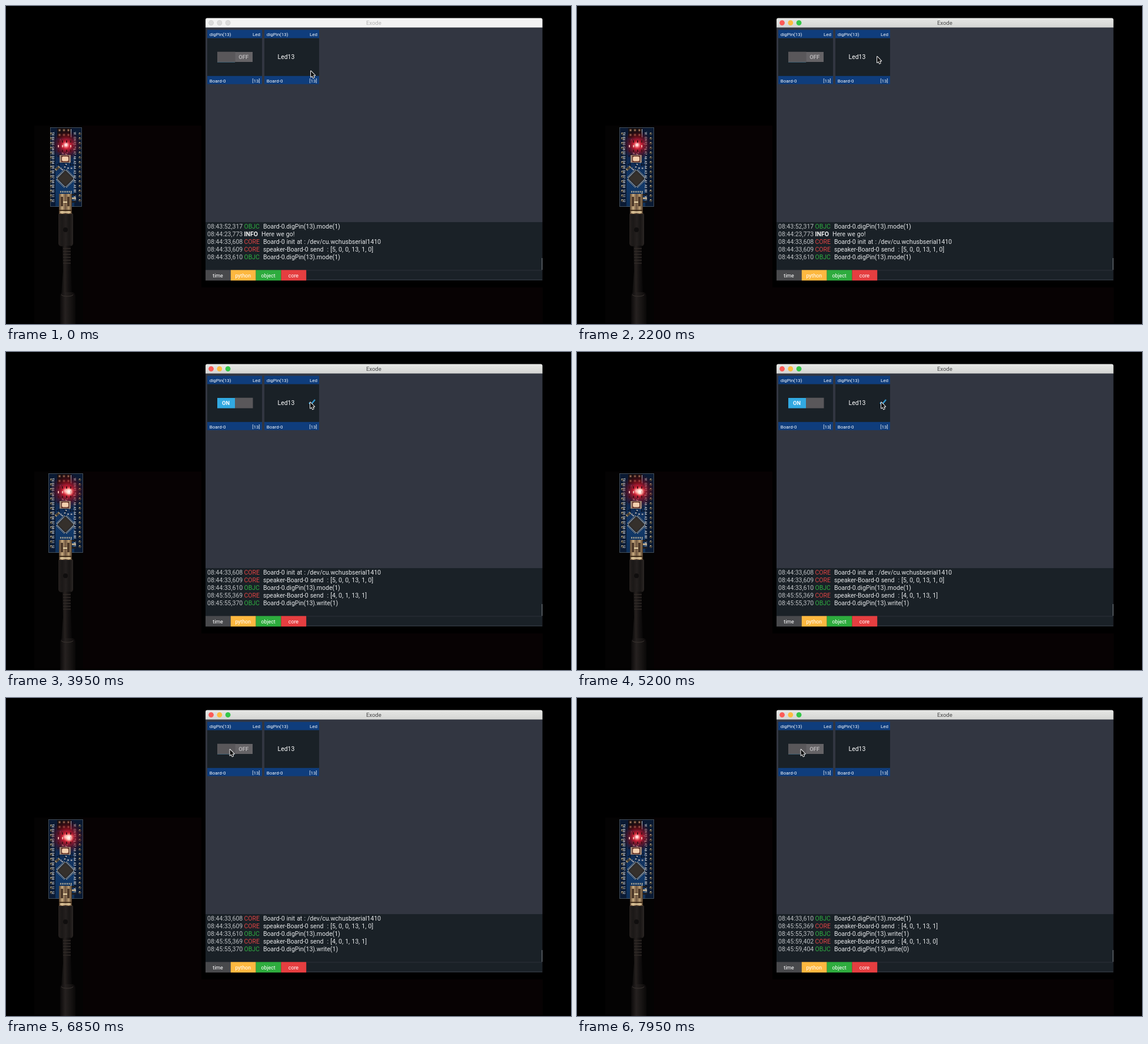
Recreate the animation shown at these times as an HTML page with a canvas. Size 960 by 540 pixels, loop 8 s.

```html
<!DOCTYPE html>
<html lang="en">
<head>
<meta charset="utf-8">
<title>Exode</title>
<style>
html, body { margin: 0; width: 100%; height: 100%; overflow: hidden; background: #000; }
canvas { display: block; }
</style>
</head>
<body>
<canvas id="stage" width="960" height="540"></canvas>
<script>
const ctx = document.getElementById('stage').getContext('2d');
const LOOP = 8000;
const TIMES = {
  focus: 1450, switchOn: 2650, switchOff: 6620,
  ledOn: 2950, ledOff: 6980, logOn: 3350, logOff: 7380
};
const SLIDE = 200;
const LOG = [
  ['08:43:52,317', 'OBJC', 'Board-0.digPin(13).mode(1)'],
  ['08:44:23,773', 'INFO', 'Here we go!'],
  ['08:44:33,608', 'CORE', 'Board-0 init at : /dev/cu.wchusbserial1410'],
  ['08:44:33,609', 'CORE', 'speaker-Board-0 send  : [5, 0, 0, 13, 1, 0]'],
  ['08:44:33,610', 'OBJC', 'Board-0.digPin(13).mode(1)'],
  ['08:45:55,369', 'CORE', 'speaker-Board-0 send  : [4, 0, 1, 13, 1]'],
  ['08:45:55,370', 'OBJC', 'Board-0.digPin(13).write(1)'],
  ['08:45:59,402', 'CORE', 'speaker-Board-0 send  : [4, 0, 1, 13, 0]'],
  ['08:45:59,404', 'OBJC', 'Board-0.digPin(13).write(0)']
];
const TAG_COLORS = { OBJC: '#2fae42', INFO: '#f4f4f4', CORE: '#e04444' };
const BUTTONS = [['time', '#48494c'], ['python', '#fdb840'], ['object', '#2eac3e'], ['core', '#e53e40']];
// Cursor moves: start, end, from, to
const MOVES = [
  [1100, 1450, [518, 110], [510, 85.5]],
  [2350, 2580, [510, 85.5], [517, 85]],
  [5650, 6250, [517, 85], [380.5, 87]]
];

function rect(x, y, w, h, color) {
  ctx.fillStyle = color;
  ctx.fillRect(x, y, w, h);
}

function poly(points, color) {
  ctx.beginPath();
  points.forEach(([x, y]) => ctx.lineTo(x, y));
  ctx.closePath();
  ctx.fillStyle = color;
  ctx.fill();
}

function rounded(x, y, w, h, r, color) {
  ctx.beginPath();
  ctx.roundRect(x, y, w, h, r);
  ctx.fillStyle = color;
  ctx.fill();
}

function disc(x, y, r, color) {
  ctx.beginPath();
  ctx.arc(x, y, r, 0, Math.PI * 2);
  ctx.fillStyle = color;
  ctx.fill();
}

function text(str, x, y, size, color, align = 'left', weight = 400) {
  ctx.font = `${weight} ${size}px Roboto, sans-serif`;
  ctx.textAlign = align;
  ctx.textBaseline = 'alphabetic';
  ctx.fillStyle = color;
  ctx.fillText(str, x, y);
}

function gradient(x0, y0, x1, y1, colors) {
  const g = ctx.createLinearGradient(x0, y0, x1, y1);
  colors.forEach((c, i) => g.addColorStop(i / (colors.length - 1), c));
  return g;
}

function glow(x, y, r, stops) {
  const g = ctx.createRadialGradient(x, y, 0, x, y, r);
  stops.forEach(([at, c]) => g.addColorStop(at, c));
  rect(x - r, y - r, r * 2, r * 2, g);
}

function noise(n) {
  const v = Math.sin(n * 12.9898) * 43758.5453;
  return v - Math.floor(v);
}

function clamp(v) {
  return Math.min(1, Math.max(0, v));
}

function drawChip() {
  ctx.save();
  ctx.translate(101, 293);
  ctx.rotate(Math.PI / 4);
  for (let side = 0; side < 4; side++) {
    for (let i = 0; i < 8; i++) rect(-9.2 + i * 2.5, -12.8, 1.2, 3.5, '#b5aa98');
    ctx.rotate(Math.PI / 2);
  }
  rect(-9.8, -9.8, 19.6, 19.6, '#292523');
  rect(-8.3, -8.3, 16.6, 16.6, '#35302c');
  ctx.restore();
}

function drawPins(x, labelX, names) {
  for (let i = 0; i < 15; i++) {
    const y = 217 + i * 8.1;
    disc(x, y, 2.1, '#7c6c50');
    disc(x, y, 1.2, '#090c12');
    disc(x - 0.6, y - 1.2, 0.9, '#e4d6ae');
  }
  ctx.save();
  ctx.translate(labelX, 214);
  ctx.rotate(Math.PI / 2);
  names.split(' ').forEach((name, i) => text(name, i * 8.1, 2, 5, '#c9ced6', 'left', 700));
  ctx.restore();
}

function drawCable() {
  rounded(89, 352, 25, 56, [2, 2, 5, 5],
    gradient(89, 0, 114, 0, ['#26211f', '#1b1817', '#24201f', '#191615', '#2b2624']));
  disc(101, 380, 4, '#100e0e');
  poly([[96, 407], [110, 407], [110, 440], [112, 488], [94, 488], [97, 450]],
    gradient(94, 0, 112, 0, ['#0b0a0a', '#26211f', '#141111', '#080707']));
  for (let y = 411; y < 438; y += 5) rect(97, y, 13, 1.5, '#302a27');
  rounded(92, 486, 26, 58, [6, 6, 0, 0],
    gradient(92, 0, 118, 0, ['#0c0a0a', '#262120', '#181514', '#0a0808']));
  ctx.strokeStyle = '#3b3531';
  ctx.lineWidth = 1;
  ctx.beginPath();
  ctx.ellipse(104, 490, 10, 3, 0, 0, Math.PI);
  ctx.stroke();
}

function drawConnector() {
  for (let i = 0; i < 7; i++) rect(92 + i * 3, 314, 1.4, 3, '#c5b99e');
  for (let i = 0; i < 3; i++) rect(112, 319 + i * 6, 7, 3, i % 2 ? '#b7aa91' : '#1b1d22');
  rect(110, 317, 1, 21, '#d7dbe0');
  rect(90, 319, 22, 34, gradient(90, 0, 112, 0, ['#594330', '#c9ab80', '#6d543f', '#b99c71', '#4c3828']));
  rect(93, 324, 4, 16, '#4d3929');
  rect(104, 324, 4, 16, '#4d3929');
  rect(97, 332, 7, 2, '#ead7ab');
  rect(90, 346, 22, 2, '#46331f');
  rect(92, 349, 18, 2, '#e0ca9e');
}

function drawLed(on) {
  const x = on ? 104 : 102.5;
  glow(x, 236, on ? 30 : 26, [
    [0, 'rgba(255,70,80,.95)'], [0.3, 'rgba(225,25,45,.8)'],
    [0.6, 'rgba(140,12,28,.5)'], [1, 'rgba(70,0,10,0)']
  ]);
  glow(102, 236, 7, [[0, '#fff'], [0.3, 'rgba(255,205,205,.95)'], [1, 'rgba(255,70,80,0)']]);
  if (on) glow(107, 237, 9, [[0, '#fff'], [0.4, 'rgba(255,220,205,.95)'], [1, 'rgba(255,60,60,0)']]);
}

function drawBoard(bright, ledOn) {
  rect(48, 203, 864, 335, '#070203');
  rect(48, 203, 83, 335, '#040303');
  drawCable();

  const left = bright ? 72 : 75;
  const right = bright ? 131 : 129;
  rect(left, 206, right - left, 135, '#0a1a33');
  rect(84, 206, 32, 135, gradient(0, 206, 0, 341, ['#0b1730', '#10264a', '#123a6c', '#0f3058']));
  ctx.strokeStyle = '#59636a';
  ctx.lineWidth = 0.7;
  ctx.strokeRect(left + 0.4, 206.4, right - left - 0.8, 134.2);
  drawPins(77, 80, 'TX RX RS GN D2 D3 D4 D5 D6 D7 D8 D9 10 11 12');
  drawPins(125.5, 117, 'VI GN RS 5V A7 A6 A5 A4 A3 A2 A1 A0 RF 3V 13');

  rect(87, 207, 24, 17, '#140f12');
  for (let i = 0; i < 6; i++) {
    const x = 91 + (i % 3) * 7.5, y = 211 + Math.floor(i / 3) * 8;
    disc(x, y, 2.4, '#533a2c');
    disc(x, y, 1, '#c09678');
  }
  rect(110, 209, 1, 14, '#c8ced6');
  for (let i = 0; i < 60; i++) {
    const shade = noise(i + 5) > 0.6 ? '#b4b2b4' : '#06101f';
    rect(86 + noise(i) * 29, 226 + noise(i + 90) * 52, 1 + noise(i + 30) * 1.8, 1 + noise(i + 60) * 2, shade);
  }
  drawLed(ledOn);
  for (let i = 0; i < 4; i++) {
    for (let j = 0; j < 3; j++) {
      if (i !== 2 || j !== 1) rect(88 + i * 7, 228 + j * 8, 2, 4, j % 2 ? '#e8a9a4' : '#4a1018');
    }
  }

  rect(91, 253, 19, 13, '#9c8270');
  rect(94, 254, 13, 11, '#5c2a22');
  rounded(95, 255.5, 11, 8, 2, '#f3cfae');

  drawChip();
  ctx.save();
  ctx.translate(87, 276);
  ctx.rotate(-0.7);
  rect(-4, -2, 9, 4, '#a8936e');
  rect(-2, -2, 5, 4, '#453c32');
  ctx.restore();
  drawConnector();
}

function drawCard(x) {
  rect(x, 40.5, 93, 92.2, '#0f3d7c');
  rect(x, 54.6, 93, 64.2, '#1a2127');
  const label = (str, dx, y, align) => text(str, x + dx, y, 8, '#f4f8fd', align);
  label('digPin(13)', 3.7, 51.3);
  label('Led', 90, 51.3, 'right');
  label('Board-0', 3.7, 130.3);
  label('[13]', 89.5, 130.3, 'right');
}

function drawSwitch(k) {
  rect(359, 78, 30, 17.5, '#32a9e1');
  rect(389, 78, 30, 17, '#656366');
  text('ON', 373.5, 90.4, 9.3, '#f4faff', 'center', 700);
  text('OFF', 403.7, 90.4, 9.5, '#b4b2b4', 'center', 700);
  rect(359 + 30 * k, 77.7, 30.5, 17.8, '#59575a');
}

function drawCheck() {
  ctx.strokeStyle = '#3399cf';
  ctx.lineWidth = 2.4;
  ctx.beginPath();
  ctx.moveTo(515, 86);
  ctx.lineTo(518, 89.5);
  ctx.lineTo(525, 81);
  ctx.stroke();
}

function drawLog(first) {
  rect(339, 367, 572.5, 99, '#1a2127');
  ctx.wordSpacing = '0.45px';
  LOG.slice(first, first + 5).forEach(([time, tag, message], i) => {
    const y = 377.6 + i * 13;
    const info = tag === 'INFO';
    text(time, 342, y, 10.5, '#bfc2c5');
    text(tag, 404.5, y, 10.5, TAG_COLORS[tag], 'left', info ? 700 : 400);
    text(message, info ? 434 : 437, y, 10.55, '#e6e8ea');
  });
  ctx.wordSpacing = '0px';
  rect(910, 428, 1.5, 20, '#5b6167');
  rect(511, 448, 400, 1.5, '#252b33');
  rect(511, 464.5, 400, 1, '#373c46');
  BUTTONS.forEach(([name, color], i) => {
    rect(339 + i * 42.8, 448.3, 42.8, 17.9, color);
    text(name, 360 + i * 42.8, 460.8, 8.8, '#fff', 'center');
  });
}

function drawTitleBar(active) {
  rounded(339, 20.6, 572.5, 16, [3, 3, 0, 0], active ? gradient(0, 21, 0, 37, ['#e6e7e5', '#d3d4d2']) : '#f3f3f3');
  const lights = active ? ['#fc5b57', '#fdbc40', '#34c648'] : ['#dbdbdb', '#dbdbdb', '#dbdbdb'];
  lights.forEach((color, i) => {
    disc(348.5 + i * 14.3, 28.6, 4.4, active ? color : '#c8c8c8');
    disc(348.5 + i * 14.3, 28.6, 3.8, color);
  });
  text('Exode', 624.8, 32.3, 9.5, active ? '#464646' : '#b0b0b0', 'center');
}

function cursorAt(t) {
  let pos = MOVES[0][2];
  for (const [start, end, from, to] of MOVES) {
    if (t < start) break;
    const p = clamp((t - start) / (end - start));
    const e = p * p * (3 - 2 * p);
    pos = from.map((v, i) => v + (to[i] - v) * e);
  }
  return pos;
}

function drawCursor([x, y]) {
  ctx.save();
  ctx.translate(x, y);
  ctx.lineJoin = 'round';
  ctx.strokeStyle = '#fff';
  ctx.lineWidth = 1.8;
  poly([[0, 0.5], [0, 10.5], [2.3, 8.4], [4, 12.3], [5.7, 11.5], [4, 7.8], [7.2, 7.8]], '#111');
  ctx.stroke();
  ctx.fill();
  ctx.restore();
}

function render(t) {
  const checked = t >= TIMES.switchOn && t < TIMES.switchOff;
  const slide = clamp((t - TIMES.switchOn) / SLIDE) - clamp((t - TIMES.switchOff) / SLIDE);
  const firstLine = t >= TIMES.logOff ? 4 : t >= TIMES.logOn ? 2 : 0;

  rect(0, 0, 960, 540, '#000');
  drawBoard(t >= 1100, t >= TIMES.ledOn && t < TIMES.ledOff);
  rect(332, 203, 7, 275, '#000');
  rect(339, 466, 573, 12, '#000');
  rect(339, 36, 572.5, 331, '#323641');
  drawTitleBar(t >= TIMES.focus);
  drawCard(342);
  drawCard(439);
  drawSwitch(1 - (1 - slide) ** 2);
  text('Led13', 475.9, 89.8, 10.4, '#fff', 'center');
  if (checked) drawCheck();
  drawLog(firstLine);
  drawCursor(cursorAt(t));
}

const begin = performance.now();
function frame() {
  render((performance.now() - begin) % LOOP);
  requestAnimationFrame(frame);
}
frame();
</script>
</body>
</html>
```
